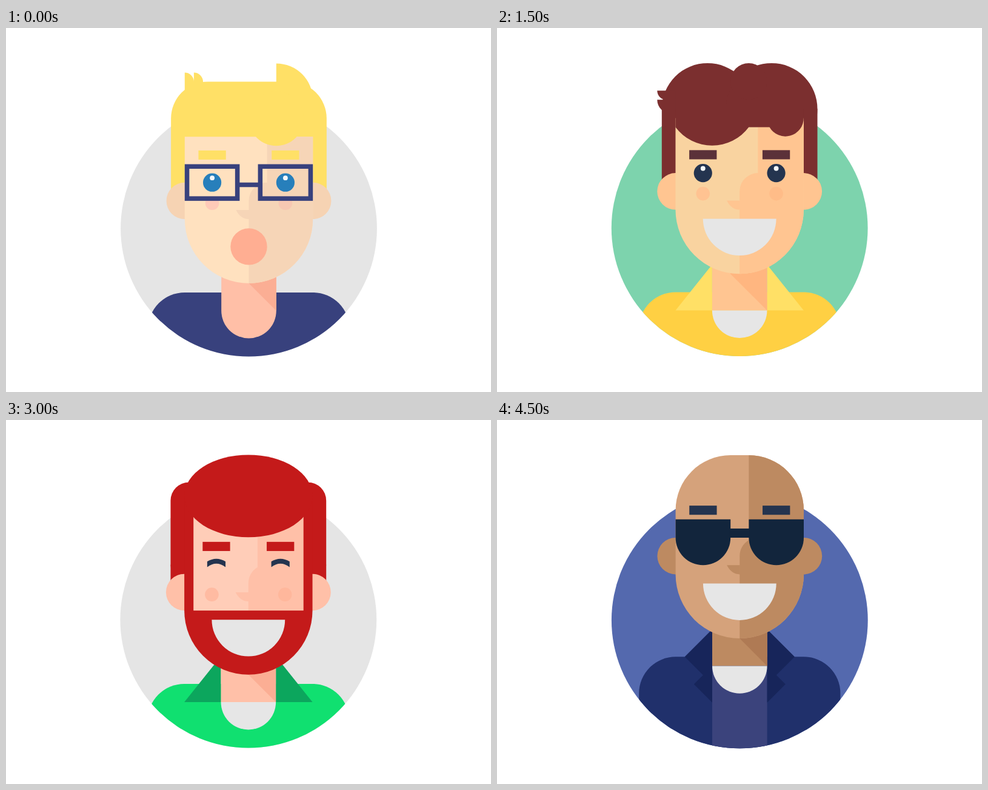
These frames come from a looping animation (800x600 px, 4800 ms). An HTML page:

```html
<!DOCTYPE html>
<html lang="en">
<head>
<meta charset="utf-8">
<title>Faces</title>
<style>
  html, body { margin: 0; width: 100%; height: 100%; overflow: hidden; background: #fff; }
  svg { display: block; width: 800px; height: 600px; }
</style>
</head>
<body>
<svg viewBox="0 0 800 600">
  <defs><clipPath id="disc"><circle r="14"/></clipPath></defs>
  <g id="stage"></g>
</svg>
<script>
// Everything is drawn on a grid of 15.1 px units centred on the disc.
const UNIT = 15.1, STEP = 300, LOOP = 4800;
const WHITE = '#e6e6e6', NAVY = '#24344f', BLUE = '#277fbb', YELLOW = '#ffe066', RED = '#c41a1a';
const INDIGO = '#38417d';
const FAIR = { light: '#ffe1bf', dark: '#f6d5b7', neck: '#ffbfa7', wedge: '#fbae94', ears: '#f6d3b3' };
const WARM = { light: '#f9d3a0', dark: '#ffc591', neck: '#ffc591', wedge: '#ffb680', ears: '#ffc591' };
const ROSY = { light: '#ffcdb8', dark: '#ffc0a8', neck: '#ffc0a8', wedge: '#fbae94', ears: '#ffc0a8' };
const TAN = { light: '#d5a27b', dark: '#bd8a61', neck: '#bd8a61', wedge: '#af7a54', ears: '#bd8a61' };

const path = (d, fill) => `<path d="${d}" fill="${fill}"/>`;
const dot = (x, y, r, fill) => `<circle cx="${x}" cy="${y}" r="${r}" fill="${fill}"/>`;
const rect = (x, y, w, h, fill, rx = 0) =>
  `<rect x="${x}" y="${y}" width="${w}" height="${h}" rx="${rx}" fill="${fill}"/>`;
const mirror = art => art + `<g transform="scale(-1 1)">${art}</g>`;
const clip = art => `<g clip-path="url(#disc)">${art}</g>`;

const shoulders = (fill, y = 7) => rect(-11, y, 22, 14, fill, 4);
const cup = (y, r, fill) => path(`M${-r} ${y}A${r} ${r} 0 0 0 ${r} ${y}Z`, fill);
const collar = (apex, fill) => mirror(path(`M-7 9H-3V${apex}Z`, fill));
const neck = (skin, chin, end, x = 0) =>
  rect(-3, chin - 4, 6, end - chin + 4, skin.neck) +
  path(`M${x} ${chin}L3 ${chin + 3 - x}V${chin - 2}H${x}Z`, skin.wedge);
const ears = (fill, y = -3) => mirror(dot(-7, y, 2, fill));

const head = (skin, top, chin) =>
  path(`M-7 ${top}V${chin - 7}A7 7 0 0 0 7 ${chin - 7}V${top}Z`, skin.light);
// Shaded half: straight down from the brow, round the eye socket, then the nose.
function shade(skin, top, chin, split = 2, dy = 0) {
  const y = dy - 3 - Math.sqrt(4 - (2 - split) ** 2);
  return path(`M${split} ${top}V${y}A2 2 0 0 0 0 ${dy - 3}V${chin}A7 7 0 0 0 7 ${chin - 7}V${top}Z`, skin.dark) +
    path(`M0.03 ${dy - 2}H-1.4Q-0.9 ${dy - 1} 0.03 ${dy - 1}Z`, skin.dark);
}

const brows = (y, fill, x = -5.5) => mirror(rect(x, y, 3, 1, fill));
const eye = (x, y, fill) => dot(x, y, 1, fill) + dot(x, y - 0.5, 0.26, '#f4f8fb');
const shut = (x, y, fill) =>
  `<g transform="translate(${x} ${y})">${path('M-1-.35Q0-.95 1-.35V.25Q0-.5-1 .25Z', fill)}</g>`;
const cheeks = (left, right, y = -2.75) => dot(-4, y, 0.75, left) + dot(4, y, 0.75, right);
const smile = fill => path('M-3 .5A3.45 3.45 0 0 0 3 .5H2.4A2.93 2.93 0 0 1-2.4 .5Z', fill);
const quiffBack = fill => rect(-8.5, -15, 17, 11, fill, 2) + rect(-8.5, -6, 17, 2.5, fill);
const quiff = fill => `<ellipse cy="-13.5" rx="7" ry="4.5" fill="${fill}"/>`;

function blondBoy() {
  const glasses = mirror(
    `<rect x="-6.75" y="-6.75" width="5.5" height="3.5" fill="none" stroke="${INDIGO}" stroke-width=".5"/>`) +
    rect(-1.1, -5, 2.2, 0.5, INDIGO);
  return dot(0, 0, 14, '#e5e5e5') +
    clip(shoulders(INDIGO)) + neck(FAIR, 6, 9, 0) + cup(9, 3, FAIR.neck) +
    path('M-8.5-4V-12A4 4 0 0 1-4.5-16H4.5A4 4 0 0 1 8.5-12V-4Z', YELLOW) +
    path('M3-18A4 4 0 0 1 7-14H3Z', YELLOW) +
    path('M-7-14V-17A1 1 0 0 1-6-16V-17A1 1 0 0 1-5-16V-14Z', YELLOW) +
    ears(FAIR.ears) + head(FAIR, -10, 6) + shade(FAIR, -10, 6) +
    dot(3, -12, 3, YELLOW) + brows(-8.5, YELLOW) + cheeks('#ffcab8', '#f7c8b2') +
    eye(-4, -5, BLUE) + eye(4, -5, BLUE) + glasses + dot(0, 2, 2, '#ffae92');
}

function grandpa() {
  return dot(0, 0, 14, '#c4f3fb') +
    clip(shoulders('#7aceda')) + collar(5, BLUE) + neck(WARM, 6, 9) + cup(9, 3, WHITE) +
    quiffBack(WHITE) + ears(WARM.ears) + head(WARM, -13, 6) + shade(WARM, -13, 6) + quiff(WHITE) +
    brows(-7.5, WHITE) + shut(-4, -5, NAVY) + shut(4, -5, NAVY) + cheeks('#ffbb83', '#ffb985') +
    path('M-4.5-.5A2.5 2.5 0 0 0 0 1A2.5 2.5 0 0 0 4.5-.5Z', WHITE);
}

function brownBoy() {
  const hair = '#7b2f2f';
  return dot(0, 0, 14, '#7dd3ad') +
    clip(shoulders('#ffd043')) + collar(4, YELLOW) + neck(WARM, 5, 9, -1) + cup(9, 3, WHITE) +
    rect(-8.5, -13, 17, 8, hair) + rect(-3.5, -16, 7, 4, hair) +
    mirror(dot(-3.5, -13, 5, hair)) + dot(1, -16, 2, hair) +
    path('M-9-15H-7V-12.5H-7.5A1.5 1.5 0 0 1-9-14H-8A1 1 0 0 1-9-15Z', hair) +
    ears(WARM.ears, -4) + head(WARM, -12, 5) + shade(WARM, -12, 5, 2, -1) +
    path('M-7-13V-11A5 5 0 0 0 1-11H3.27A2 2 0 0 0 7-12V-13Z', hair) +
    brows(-8.5, '#5b3139') + eye(-4, -6, NAVY) + eye(4, -6, NAVY) +
    cheeks('#ffc392', '#ffbc88', -3.75) + cup(-1, 4, WHITE);
}

function blondGirl() {
  let fringe = '';
  for (let x = -6; x <= 6; x += 3) fringe += dot(x, -12, 2, YELLOW);
  return dot(0, 0, 14, '#ffcde4') +
    cup(-2, 11, YELLOW) + path('M-9.5-1V-9A9 9 0 0 1-.5-18H.5A9 9 0 0 1 9.5-9V-1Z', YELLOW) +
    clip(shoulders('#824a9b')) + neck(FAIR, 6, 9) + cup(9, 3, FAIR.neck) +
    ears(FAIR.ears) + mirror(dot(-8, -1, 0.77, WHITE)) +
    head(FAIR, -12, 6) + shade(FAIR, -12, 6) + rect(-7.1, -13, 14.2, 1.5, YELLOW) + fringe +
    brows(-8.5, YELLOW) + shut(-4, -5, BLUE) + shut(4, -5, BLUE) +
    cheeks('#ffbfa7', '#fabda5') + smile('#ffb59d');
}

function redBeard() {
  return dot(0, 0, 14, '#e5e5e5') +
    clip(shoulders('#10e070')) + collar(4, '#0ca65d') + neck(ROSY, 6, 9) + cup(9, 3, WHITE) +
    quiffBack(RED) + ears(ROSY.ears) + head({ light: RED }, -13, 6) +
    rect(-6, -12, 12, 11, ROSY.light) +
    path('M1-12V-5.73A2 2 0 0 0 0-4V-1H6V-12Z', ROSY.dark) +
    path('M.03-3H-1.4Q-.9-2 .03-2Z', ROSY.dark) + quiff(RED) +
    brows(-8.5, RED, -5) + shut(-3.5, -6, NAVY) + shut(3.5, -6, NAVY) +
    cheeks('#ffbba2', '#ffb79c') + cup(0, 4, WHITE);
}

function pigtails() {
  const tie = '#fa5720';
  return dot(0, 0, 14, YELLOW) +
    mirror(path('M-12 7V-13A5 5 0 0 1-2-13L-4-1A8 8 0 0 1-12 7Z', '#d62a2a')) +
    clip(shoulders(WARM.light) + rect(-7, 7, 14, 8, '#ff3a3a')) +
    neck(WARM, 6, 8, 1) + cup(8, 3, WARM.neck) +
    path('M-8.5-4V-7.5A8.5 8.5 0 0 1 8.5-7.5V-4Z', RED) +
    mirror(dot(-4, -15, 0.77, tie) + dot(-3, -15, 0.77, tie)) +
    dot(-7, -3, 2, WARM.light) + dot(7, -3, 2, WARM.dark) +
    head(WARM, -8, 6) + shade(WARM, -8, 6) +
    brows(-7.5, RED) + eye(-4, -5, NAVY) + shut(4, -5, NAVY) +
    cheeks('#ffbb83', '#ffbb85') + smile('#ffbb83');
}

function sunglasses() {
  const lens = '#12253c';
  return dot(0, 0, 14, '#5469ae') +
    clip(shoulders('#20306b', 4) + rect(-3, 5, 6, 10, '#3b437c')) +
    mirror(path('M-3 1L-6 4L-4 6L-5 7L-3 9Z', '#17255a')) +
    neck(TAN, 2, 5) + cup(5, 3, WHITE) + ears(TAN.ears, -7) +
    path('M-7-5V-12A6 6 0 0 1-1-18H1A6 6 0 0 1 7-12V-5A7 7 0 0 1-7-5Z', TAN.light) +
    path('M1-18A6 6 0 0 1 7-12H1Z', TAN.dark) + shade(TAN, -12.05, 2, 1, -4) +
    brows(-12.5, NAVY) + mirror(path('M-7-11H-1V-9A3 3 0 0 1-7-9Z', lens)) +
    rect(-1.1, -10, 2.2, 1, lens) + cup(-4, 4, WHITE);
}

const cast = [blondBoy, grandpa, brownBoy, blondGirl, redBeard, pigtails, sunglasses];
const order = [0, 5, 2, 1, 3, 2, 6, 4, 3, 1, 4, 0, 5, 2, 3, 6];
const stage = document.getElementById('stage');
stage.innerHTML = cast.map(draw => `<g display="none">${draw()}</g>`).join('');
const faces = [...stage.children];

let shown = -1;
function render(ms) {
  const slot = Math.floor((ms % LOOP) / STEP);
  if (slot === shown) return;
  shown = slot;
  // The whole portrait drifts by about a pixel over the loop.
  const drift = slot < 12 ? 1 - slot / 12 : (slot - 12) / 4;
  stage.setAttribute('transform',
    `translate(${399.7 + 0.8 * drift} ${329 + 1.2 * drift}) scale(${UNIT})`);
  faces.forEach((face, i) => face.setAttribute('display', i === order[slot] ? 'inline' : 'none'));
}

const start = performance.now();
function tick() {
  render(performance.now() - start);
  requestAnimationFrame(tick);
}
render(0);
requestAnimationFrame(tick);
</script>
</body>
</html>
```
